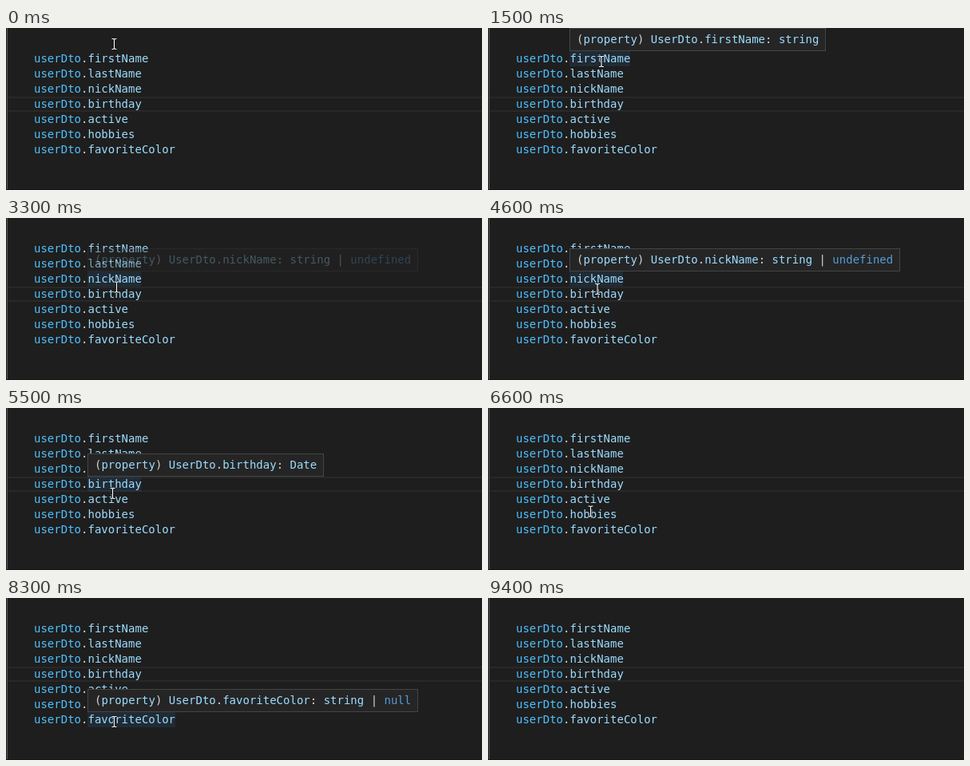
These frames come from a looping animation (596 px wide and 203 px high, 9800 ms). An HTML page:

```html
<!DOCTYPE html>
<html lang="en">
<head>
<meta charset="utf-8">
<title>Type hover</title>
<style>
  html, body { margin: 0; width: 100%; height: 100%; overflow: hidden; background: #1e1e1e; }
  #stage {
    position: relative; width: 596px; height: 203px; overflow: hidden;
    background: #1e1e1e; color: #d4d4d4;
    font: 14px/19px "DejaVu Sans Mono", monospace; white-space: pre;
  }
  #stage > * { position: absolute; }
  .edge { left: 1px; top: 0; width: 1px; height: 203px; background: #5c5c5c; }
  .base { left: 0; top: 202px; width: 596px; height: 1px; background: #1a1515; }
  .current {
    left: 2px; top: 86px; width: 594px; height: 19px; box-sizing: border-box;
    border: solid #282828; border-width: 2px 0;
  }
  .row { left: 35px; height: 19px; }
  .object { color: #4fc1ff; }
  .name { color: #9cdcfe; }
  .keyword { color: #569cd6; }
  .mark { height: 19px; left: 102px; background: rgba(38, 79, 120, .25); }
  .tip {
    left: 102px; height: 19px; padding: 4px 8px;
    background: #252526; border: 1px solid #454545;
  }
  #pointer { left: 0; top: 0; overflow: visible; }
</style>
</head>
<body>
<div id="stage">
  <div class="edge"></div>
  <div class="base"></div>
  <div class="current"></div>
</div>
<script>
const LOOP = 9800, STEP = 100, FIRST_TOP = 29, LINE = 19, CHAR = 8.43;
const stage = document.getElementById("stage");

// Property, its type, and when its tooltip appears and disappears (ms).
const properties = [
  ["firstName", "string", 800, 1600],
  ["lastName", "string", 2200, 3000],
  ["nickName", "string | undefined", 3300, 4700],
  ["birthday", "Date", 5000, 5600],
  ["active", "boolean", 6000, 6600],
  ["hobbies", "string[]", 7100, 7700],
  ["favoriteColor", "string | null", 8200, 9000],
];

// Pointer path: time, x, y of the centre.
const path = [
  [0, 135.5, 20], [200, 135.5, 20], [600, 143, 38], [1400, 143, 38],
  [1800, 139, 54], [2000, 139, 54], [2100, 137.5, 59], [2800, 137.5, 59],
  [3200, 138.5, 86.5], [4000, 138.5, 86.5], [4200, 138, 84], [4500, 138, 84],
  [4800, 135, 99], [5400, 135, 99], [5500, 133.5, 107], [5600, 131.5, 117],
  [5800, 131.5, 117], [5900, 130.5, 116], [6500, 130.5, 116], [6600, 128.5, 129.5],
  [6800, 134, 142], [6900, 134, 142], [7000, 135, 141], [7500, 135, 141],
  [7600, 136.5, 144], [7900, 135.5, 155], [8900, 135.5, 155], [9000, 120, 140],
  [9300, 51, 8], [9400, 45, -30], [LOOP, 45, -30],
];

function add(className, top, html = "") {
  const element = document.createElement("div");
  element.className = className;
  element.style.top = top + "px";
  element.innerHTML = html;
  stage.append(element);
  return element;
}

const paint = text => text.replace(/\w+/g, word =>
  `<span class="${/^(undefined|null)$/.test(word) ? "keyword" : "name"}">${word}</span>`);

const topOf = index => FIRST_TOP + LINE * index;

const marks = properties.map(([name], i) => {
  const mark = add("mark", topOf(i));
  mark.style.width = name.length * CHAR + "px";
  return mark;
});
properties.forEach(([name], i) =>
  add("row", topOf(i), `<span class="object">userDto</span>.<span class="name">${name}</span>`));
const tips = properties.map(([name, type], i) =>
  add("tip", topOf(i) - 29, paint(`(property) UserDto.${name}: ${type}`)));

const beam = "M-3-6.5h2L0-5.5 1-6.5h2M0-5.5v11M-3 6.5h2L0 5.5 1 6.5h2";
stage.insertAdjacentHTML("beforeend", `
  <svg id="pointer" width="1" height="1" fill="none">
    <path d="${beam}" stroke="#111" stroke-width="2.6"/>
    <path d="${beam}" stroke="#fff" stroke-width="1.1"/>
  </svg>`);
const pointer = document.getElementById("pointer");

function pointerAt(time) {
  const next = path.findIndex(key => key[0] > time);
  const [t0, x0, y0] = path[next - 1], [t1, x1, y1] = path[next];
  const k = (time - t0) / (t1 - t0);
  return [x0 + (x1 - x0) * k, y0 + (y1 - y0) * k];
}

function draw(now) {
  const time = Math.floor((now % LOOP) / STEP) * STEP;
  properties.forEach(([, , show, hide], i) => {
    const visible = time >= show && time < hide;
    marks[i].style.opacity = visible ? 1 : 0;
    tips[i].style.opacity = !visible ? 0 : time === show ? 0.3 : 1;
  });
  const [x, y] = pointerAt(time);
  pointer.style.transform = `translate(${x}px, ${y}px)`;
}

let start;
function tick(now) {
  start ??= now;
  draw(now - start);
  requestAnimationFrame(tick);
}
draw(0);
requestAnimationFrame(tick);
</script>
</body>
</html>
```
